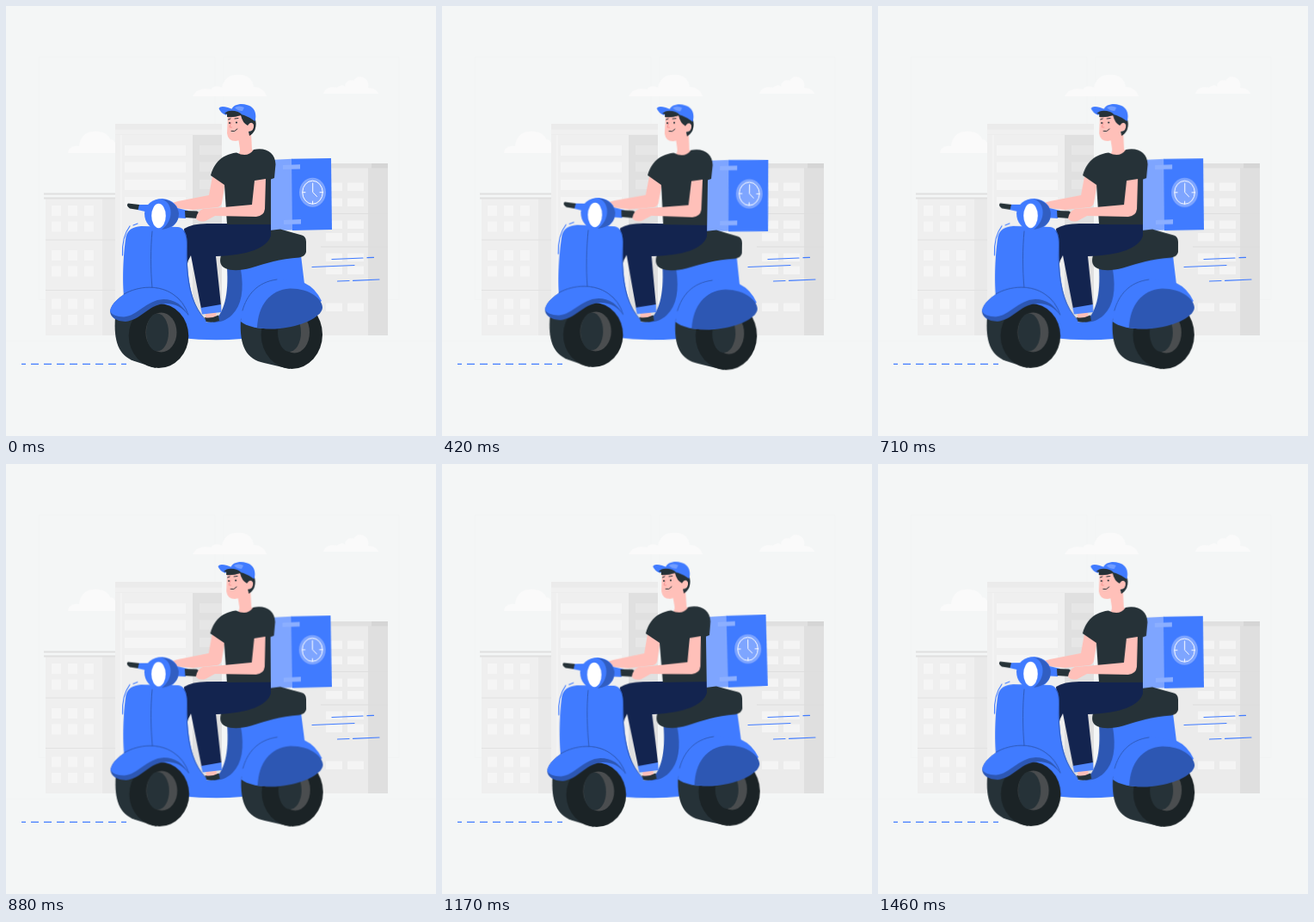
Write an HTML page without scripts that moves like this. It is 500 px wide and 500 px high and loops after 1.5 s.

```html
<!DOCTYPE html>
<html lang="en">
<head>
<meta charset="utf-8">
<title>Scooter delivery</title>
<style>
  html, body { margin: 0; width: 100%; height: 100%; overflow: hidden; background: #f4f6f6; }
  svg { display: block; width: 100%; height: 100%; }
  .blue { fill: #407bff; }
  .cuff { fill: #4f86ff; }
  .shade { fill: #2d57b3; }
  .dark { fill: #263238; }
  .tyre { fill: #1b2326; }
  .rim { fill: #4a4d4f; }
  .skin { fill: #ffc0b9; }
  .navy { fill: #13244f; }
  .pale { fill: #8cafff; }
  .cloud { fill: #fafafa; }
  .line { fill: none; stroke: #407bff; stroke-width: 1.2; stroke-linecap: round; }
  .dashes { stroke-dasharray: 9 6; stroke-dashoffset: 4; stroke-linecap: butt; }
  .crease { fill: none; stroke: #2d57b3; stroke-width: .9; stroke-linecap: round; }
  .white { fill: none; stroke: #fff; stroke-width: 1; stroke-linecap: round; }
  .ink { fill: none; stroke: #263238; stroke-width: 1; stroke-linecap: round; }
  .ride { transform-origin: 249.5px 269px; animation: sway 1.5s linear infinite; }
  @keyframes sway {
    0%, 100% { transform: rotate(0); }
    25% { transform: rotate(1deg); }
    75% { transform: rotate(-1deg); }
  }
</style>
</head>
<body>
<svg viewBox="0 0 500 500">
  <defs>
    <g id="panes" fill="#f5f5f5">
      <path id="row" d="M53 232h11v12h-11zM72 232h11v12h-11zM91 232h11v12h-11z"/>
      <use href="#row" y="18.5"/>
    </g>
    <g id="slats">
      <path d="M138 162h71v12h-71z" fill="#f5f5f5"/>
      <path d="M225 162h26v11h-26z" fill="#e6e6e6"/>
    </g>
    <path id="pair" d="M372 205.5h19v9.5h-19zM397 205.5h19v9.5h-19z" fill="#f4f4f4"/>
  </defs>

  <path d="M38 59.500h205v282H38zM253 59.500h204v282H253zM0 389h500" fill="none" stroke="#f2f4f4"/>

  <g class="cloud">
    <path d="M72 171C73 164 79 162 85 163C86 153 92 146 102 146C112 145 119 149 121 155C126 155 129 159 128 171Z"/>
    <path d="M217 105C221 97 230 95 238 97C242 92 248 93 251 95C253 84 261 79 270 80C281 79 287 86 288 94C295 94 301 98 303 105Z"/>
    <path d="M369 102C371 95 379 93 385 95C388 92 392 92 394 94C395 87 400 85 404 87C407 82 412 81 417 84C421 86 422 91 421 95C427 96 431 97 433 102Z"/>
  </g>

  <!-- tall block -->
  <path d="M127 143h91v240h-91z" fill="#efefef"/>
  <path d="M217 149h34v234h-34z" fill="#e0e0e0"/>
  <path d="M127 137h124v13h-124z" fill="#ebebeb"/>
  <path d="M127 143.5h124v6h-124z" fill="#f0f0f0"/>
  <path d="M134 150v233" stroke="#f4f4f4" stroke-width="1.5"/>
  <use href="#slats"/><use href="#slats" y="19.5"/><use href="#slats" y="40"/><use href="#slats" y="60"/>

  <!-- left block -->
  <path d="M46 224h81v159H46z" fill="#efefef"/>
  <path d="M112 224h15v159h-15z" fill="#e9e9e9"/>
  <path d="M44 218.5h83M44 223.5h83" stroke="#e0e0e0" stroke-width="2"/>
  <path d="M46 272h81M46 330.5h81" stroke="#e2e2e2" stroke-width="1.2"/>
  <use href="#panes"/><use href="#panes" y="52"/><use href="#panes" y="108.5"/>

  <!-- right block -->
  <path d="M335 184h87v199h-87z" fill="#ebebeb"/>
  <path d="M421 184h23v199h-23z" fill="#dfdfdf"/>
  <path d="M366 183h59v5.5h-59z" fill="#e0e0e0"/>
  <path d="M425 183h19v5.5h-19z" fill="#d5d5d5"/>
  <path d="M366 241.5h78M366 280h78" stroke="#dedede" stroke-width="1.2"/>
  <use href="#pair"/><use href="#pair" y="18"/><use href="#pair" y="44"/><use href="#pair" y="58.5"/>
  <use href="#pair" y="82"/><use href="#pair" y="97"/><use href="#pair" y="140"/>

  <path class="line" d="M379 294.5L415 293M420 292.7L427.5 292.4M356 303.5L405 301.5M385.5 320L399 319.5M403.5 319.3L434 318"/>
  <path class="line dashes" d="M18 416.3H140"/>

  <g class="ride">
    <!-- delivery box -->
    <path d="M306 179L333 177.8L333.5 260.5L307 261Z" fill="#7ea5ff"/>
    <path class="blue" d="M332 177.8L378 177L379 260L333 261Z"/>
    <path class="pale" d="M322 185L342 184.3V189.5L322 190ZM323 249L343 248V253.5L323 254Z"/>
    <ellipse cx="356.5" cy="216.7" rx="15.5" ry="17" fill="#7ea5ff"/>
    <ellipse class="white" cx="356.5" cy="216.7" rx="11.8" ry="13.5"/>
    <path class="white" d="M356.7 206V216.5L361.5 221.5M356.6 227v3M345 216.7h3M365 216.7h3"/>

    <!-- rear body -->
    <path class="blue" d="M206 357C220 369 238 370 250 364C268 352 268 330 266 305L343 290L347 323L320 380L274 387Q240 390 203 386Z"/>
    <path class="shade" d="M257 304L273 306C277 330 274 348 263 359C256 366 248 368 240 368C254 358 259 335 257 304Z"/>

    <!-- rear wheel -->
    <path class="dark" d="M273 364C271 396 280 411 300 415L330 422V350H290Z"/>
    <ellipse class="tyre" cx="332.3" cy="382" rx="35.7" ry="40"/>
    <ellipse class="rim" cx="335.5" cy="379.5" rx="17.5" ry="24"/>
    <ellipse class="dark" cx="329.5" cy="379.5" rx="13.5" ry="22.5"/>
    <path class="blue" d="M273 367C274 342 288 320 316 316L347 322Q360 328 367 343L318 375Q286 377 273 367Z"/>
    <path class="shade" d="M292 374C293 348 307 330 330 328.5C352 328 368 340 368 351C367 362 342 373 318 375Q302 376 292 374Z"/>
    <path class="crease" d="M275 354C280 336 292 321 315 318"/>

    <path class="dark" d="M250 290L306 261L319 259.5L344 266.5Q349 268 349 274V286Q348 291 341 292.5C318 294 303 299 285 304.5C272 308 262 308 255 305C249 302 248 297 250 290Z"/>

    <!-- far arm -->
    <path class="skin" d="M240 198L236 220L200 227L193 229L198 235L217 237L246 234Q250 233 251 229L255 205Z"/>

    <!-- legs -->
    <path class="navy" d="M207 259Q216 253 234 253H308V267C304 281 282 290 244 291L250 348L227 352L215 290Q211 296 210 303Z"/>
    <path class="skin" d="M232 356L244 355L245 363L232 363Z"/>
    <path class="cuff" d="M226.5 351L250 347L250.5 356L228 358.5Z"/>
    <path class="dark" d="M231 362Q238 364 247 359.5L248 366Q240 369 232 367Z"/>

    <!-- torso -->
    <path class="skin" d="M270 153L285 147L286 167L291 169Q281 178 267 175Q273 171 272 166Z"/>
    <path class="dark" d="M268 170.5Q281 177 288 167C303 164 313 171 313.500 184L312 200L308 201.500V254H257L254 208L238 197C241 186 248 173 268 170.5Z"/>

    <!-- front shield -->
    <path class="blue" d="M137 337C135 312 137 284 139.5 268Q142 257 157 256L200 257Q210 258 210.5 275C210 312 214 346 232 365L238 387L180 380Z"/>
    <path class="crease" d="M170 262C168 282 168 306 170 328M207 262C213 270 209 286 210.5 302C212 330 218 350 232 365"/>

    <!-- front wheel -->
    <path class="dark" d="M127 362C125 390 131 406 148 412.500L174 421V346H140Z"/>
    <ellipse class="tyre" cx="177.5" cy="383.5" rx="34.8" ry="37.5"/>
    <ellipse class="rim" cx="180.5" cy="379.5" rx="18" ry="23"/>
    <ellipse class="dark" cx="176" cy="379.5" rx="13" ry="22"/>
    <path class="shade" d="M121 355C122 346 133 337 145 331C164 324 188 328 201 340Q209 347 212 360Q202 345 184 346C165 348 157 365 139 367Q122 366 121 355Z"/>
    <path class="blue" d="M121 355C122 346 133 337 145 331C164 324 188 328 201 340Q209 347 212 360Q202 341 183 341C163 342 154 360 137 361.5Q124 361 121 355Z"/>
    <path class="crease" d="M137 335C155 325 178 324 194 335Q207 344 212 359"/>
    <path class="line" d="M135.5 290C135 277 137 265 144 256M148 255L153 253"/>

    <!-- handlebar -->
    <path class="blue" d="M152 231L170 231L195 234L212 238L209 247L192 246L153 237Z"/>
    <path class="dark" d="M142 229.5L155 231L153.5 237L144 235.5Q139 232 142 229.5ZM208 238L222 238.5Q226 240 223 247L208.5 246Z"/>
    <path class="blue" d="M161 241C162 231 170 224 182 224C194 225 201 233 201 242C201 253 191 261 179 261C168 260 161 252 161 241Z"/>
    <path class="shade" d="M182 225C194 229 196 249 181 260C195 258 201 251 201 241C200 232 192 225 182 225Z" opacity=".8"/>
    <ellipse cx="177.5" cy="244" rx="8.3" ry="14.2" fill="#fff"/>

    <!-- near arm -->
    <path class="skin" d="M289 203L302 201L301 236Q300 244 291 245L243 244L232 250Q224 252 221 247Q222 239 229 236L242 235L286 231Z"/>

    <!-- head -->
    <path class="skin" d="M258 126L257 148Q258 157 267 157Q278 156 284 145C291 146 293 135 285 136L282 126Z"/>
    <path class="dark" d="M257 124L266 122L289 129Q292 137 289.5 144Q287 149 283 151L282 146Q289 145 288 138Q285 133 281 139Q275 136 273 127Q265 130 257 129Z"/>
    <path class="blue" d="M262 121C264 114 274 113 280 115C289 117 292 125 289.500 134Q278 125 262 124Z"/>
    <path class="blue" d="M247.5 119Q249 115.500 258 118L266 121Q258 122 256 127Q249 124 247.5 119Z"/>
    <path class="dark" d="M254 125Q258 120.500 266 122Q274 124 274 127Q265 128 254 125Z"/>
    <path class="pale" d="M266 118Q271 115 277 118L275 122Q269 122 266 118Z" opacity=".65"/>
    <path class="ink" d="M262 145.5Q266 147 269 143M258.5 132L261 131M266 131L270 130.5"/>
    <path d="M262 135L260 141L263 141" fill="none" stroke="#f28f8f" stroke-width=".8"/>
    <circle class="dark" cx="260" cy="136" r="1"/><circle class="dark" cx="268" cy="135.5" r="1.1"/>
  </g>
</svg>
</body>
</html>
```
